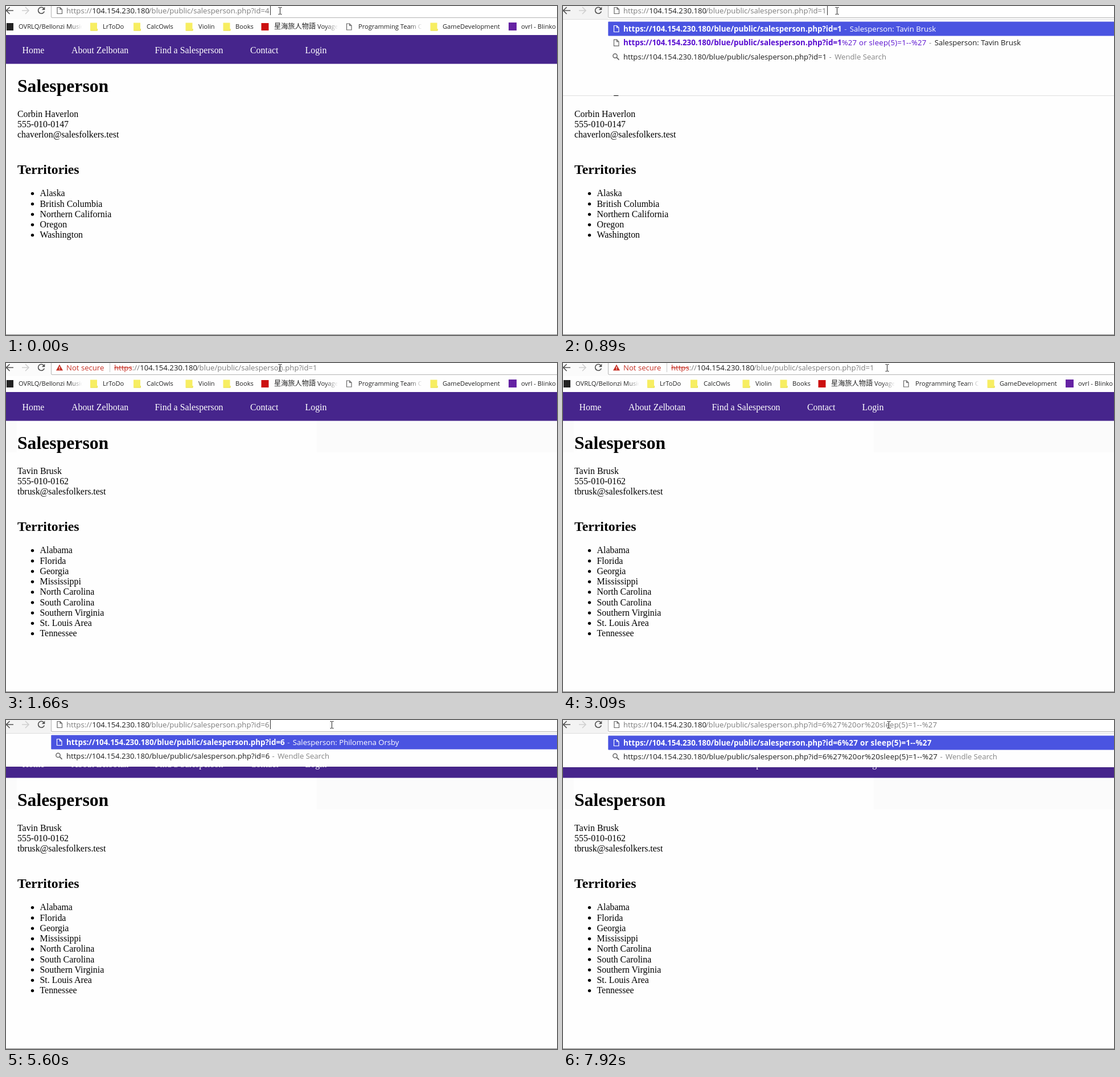
These frames come from a looping animation (968 by 578 pixels, 8 s). An HTML page:

```html
<!DOCTYPE html>
<html lang="en">
<head>
<meta charset="utf-8">
<title>Salesperson page</title>
<style>
html, body { margin: 0; width: 100%; height: 100%; overflow: hidden; background: #fefefe; }
svg { display: block; width: 100vw; height: 100vh; }
text { white-space: pre; }
.ui { font: 13.15px "Open Sans", "Noto Sans", sans-serif; }
.ui .b { font-size: 13.4px; font-weight: 700; }
.code { letter-spacing: .27px; }
.dash { letter-spacing: 1px; }
.mark { font: 11.15px "Open Sans", "Noto Sans", sans-serif; fill: #222; }
.cjk { font: 12.2px "Noto Sans CJK JP", "Noto Sans CJK", sans-serif; }
.page { font: 15.9px "Liberation Serif", "Times New Roman", serif; }
</style>
</head>
<body>
<svg id="stage" viewBox="0 0 968 578" preserveAspectRatio="none">
  <defs>
    <linearGradient id="fade">
      <stop offset="0" stop-color="#fefefe" stop-opacity="0"/>
      <stop offset="1" stop-color="#fefefe"/>
    </linearGradient>
  </defs>
  <g id="page"></g>
  <g id="marks"></g>
  <g id="menu" class="ui"></g>
  <g id="bar" class="ui"></g>
</svg>
<script>
const LOOP = 8000;
const BLUE = '#4a54e1', RED = '#c62f24', LINK = '#5a0fd0', GREY = '#7c7c7c';
const INJECTED = '%27%20or%20sleep(5)=1--%27', PLAIN = '%27 or sleep(5)=1--%27';
const ADDRESS = 'https://104.154.230.180/blue/public/salesperson.php?id=';

const people = [
  { name: 'Corbin Haverlon', phone: '555-010-0147', mail: 'chaverlon@salesfolkers.test',
    areas: ['Alaska', 'British Columbia', 'Northern California', 'Oregon', 'Washington'] },
  { name: 'Tavin Brusk', phone: '555-010-0162', mail: 'tbrusk@salesfolkers.test',
    areas: ['Alabama', 'Florida', 'Georgia', 'Mississippi', 'North Carolina', 'South Carolina',
      'Southern Virginia', 'St. Louis Area', 'Tennessee'] }
];

// Menu rows: bold part, plain part, page title
const title = name => 'Salesperson: ' + name;
const menus = {
  all: { bottom: 157, rows: [
    ['', '', ''], ['', '1', title('Tavin Brusk')],
    ['', '1' + PLAIN, title('Tavin Brusk')], ['', '3', title('Vilena Borsk')]] },
  one: { bottom: 157, rows: [
    ['1', '', title('Tavin Brusk')], ['1', PLAIN, title('Tavin Brusk')]] },
  six: { bottom: 83, rows: [['6', '', title('Philomena Orsby')]] },
  paste: { bottom: 83, rows: [['6' + PLAIN, '', '']] }
};

// Each step changes part of the state from its time on
const steps = [
  [0, { id: '4', tail: '', icon: 'page', mouse: 481.5, who: 0, caret: 464, menu: '', shift: 0,
        busy: false, warn: false, chip: false, select: '', band: 0 }],
  [120, { caret: 0 }],
  [260, { id: '', caret: 456, menu: 'all', shift: -1 }],
  [380, { shift: 0 }],
  [770, { id: '1', caret: 464, menu: 'one' }],
  [1040, { menu: '', caret: 0, icon: 'info', busy: true, band: 1 }],
  [1510, { icon: 'alert', warn: true }],
  [1660, { chip: true, busy: false, who: 1, band: 2 }],
  [2810, { mouse: 566 }],
  [2960, { mouse: 562.5 }],
  [3090, { mouse: 569.5 }],
  [3230, { mouse: 572.5 }],
  [3480, { select: 'all' }],
  [3880, { select: 'id' }],
  [5600, { id: '6', icon: 'page', warn: false, chip: false, select: '', caret: 464, menu: 'six', shift: -1 }],
  [5720, { shift: 0 }],
  [6000, { caret: 0 }], [6150, { caret: 464 }], [6300, { caret: 0 }],
  [6610, { caret: 464 }], [6760, { caret: 0 }],
  [6910, { tail: INJECTED, menu: 'paste', caret: 658 }],
  [7190, { caret: 0 }], [7340, { caret: 658 }], [7490, { caret: 0 }],
  [7770, { caret: 658 }], [7920, { caret: 0 }]
];

const $ = id => document.getElementById(id);
const rect = (x, y, w, h, fill, more = '') =>
  `<rect x="${x}" y="${y}" width="${w}" height="${h}" fill="${fill}" ${more}/>`;
const line = (d, stroke, w = 1) => `<path d="${d}" fill="none" stroke="${stroke}" stroke-width="${w}"/>`;
const text = (x, y, s, fill = '#000', more = '') => `<text x="${x}" y="${y}" fill="${fill}" ${more}>${s}</text>`;
const span = (s, fill, cls = '') => `<tspan fill="${fill}" class="${cls}">${s}</tspan>`;

const pageIcon = (x, y, c) =>
  line(`M${x - 4} ${y - 5.5}h5l3.5 3.5v7.5h-8.5zM${x + 1} ${y - 5.5}v3.5h3.5`, c, 1.2);
const searchIcon = (x, y) =>
  `<circle cx="${x - 1.5}" cy="${y - 1.5}" r="3.6" fill="none" stroke="#666" stroke-width="1.5"/>` +
  line(`M${x + 1.2} ${y + 1.2}L${x + 5.5} ${y + 5.5}`, '#666', 1.8);

const icons = {
  page: () => pageIcon(94, 8, '#666'),
  info: () => '<circle cx="94" cy="8" r="5.8" fill="none" stroke="#666" stroke-width="1.3"/>' +
    rect(93.3, 7, 1.5, 4.3, '#666') + rect(93.3, 4.4, 1.5, 1.5, '#666'),
  alert: () => `<path d="M94 2.5L100 13.3H88z" fill="${RED}"/>` +
    rect(93.4, 6.3, 1.3, 3.5, '#fff') + rect(93.4, 10.7, 1.3, 1.3, '#fff')
};

function drawPage(s) {
  const p = people[s.who];
  let out = rect(0, 0, 968, 578, '#fefefe');
  if (s.band === 1) out += rect(0, 101, 968, 56, '#fbfbfb');
  if (s.band === 2) out += rect(0, 101, 19, 56, '#fbfbfb') + rect(546, 101, 422, 56, '#fbfbfb');
  out += rect(0, 51, 968, 50.6, '#46258c') + rect(0, 577, 968, 1, '#858585');
  const nav = [[28.5, 'Home'], [115, 'About Zelbotan'], [261.5, 'Find a Salesperson'], [429, 'Contact'], [525.5, 'Login']];
  for (const [x, label] of nav) out += text(x, 82.6, label, '#fff');
  out += text(20, 151, 'Salesperson', '#000', 'font-size="31.7" font-weight="700"');
  [p.name, p.phone, p.mail].forEach((s, i) => out += text(20, 195 + i * 18.2, s));
  out += text(20, 295, 'Territories', '#000', 'font-size="23.75" font-weight="700"');
  p.areas.forEach((area, i) => {
    const y = 334.3 + i * 18.25;
    out += `<circle cx="46.5" cy="${y - 4.7}" r="2.7"/>` + text(59.5, y, area);
  });
  return `<g class="page">${out}</g>`;
}

function drawMarks() {
  const labels = [[22, 'OVRLQ/Bellonzi Music'], [170, 'LrToDo'], [247, 'CalcOwls'], [338, 'Violin'], [403, 'Books'],
    [471, '<tspan class="cjk">星海旅人物語</tspan> Voyage'], [619, 'Programming Team Co'],
    [767, 'GameDevelopment'], [905, 'ovrl - Blinko']];
  let out = rect(0, 21, 968, 30, '#fefefe');
  for (const [x, s] of labels) out += text(x, 40.2, s, '#222', 'class="mark"');
  for (const x of [134, 583, 731]) out += rect(x - 22, 27, 22, 19, 'url(#fade)') + rect(x, 27, 13, 19, '#fefefe');
  for (const x of [148, 224, 315.5, 381.5, 745.5])
    out += `<path d="M${x} 29.5h12v11h1v3h-13z" fill="#f7ee62"/>` + line(`M${x + .5} 43h12v-3`, '#e8dd55');
  out += rect(1, 30, 12, 13, '#222') + rect(448.5, 30, 13, 13, '#cc1010') + rect(883, 29, 14, 14, '#6522a3');
  return out + pageIcon(602.5, 36.5, '#666');
}

function drawMenu(s) {
  const menu = menus[s.menu];
  if (!menu) return '';
  const bottom = menu.bottom + s.shift;
  let out = rect(0, 22, 968, bottom - 22, '#fefefe') + rect(0, 23, 968, 1, '#dedede') +
    rect(0, bottom, 968, 1, '#000', 'opacity=".12"') + rect(79.3, 27.6 + s.shift, 889, 24.8, BLUE, 'rx="1"');
  const dash = fill => span(' - ', fill, 'dash');
  const baseline = i => 44.8 + s.shift + i * 24.65;
  menu.rows.forEach(([bold, plain, name], i) => {
    const on = i === 0, y = baseline(i), code = bold.length > 1 ? 'b code' : 'b';
    let parts = span(ADDRESS, on ? '#fff' : LINK, 'b') + span(bold, on ? '#fff' : LINK, code) +
      span(plain, LINK, plain.length > 1 ? 'code' : '');
    if (name) parts += dash(on ? '#c3c7f7' : '#888') + span(name, on ? '#fff' : '#1c1c1c');
    out += pageIcon(93.5, y - 4.8, on ? '#fff' : '#666') + text(106, y, parts);
  });
  const y = baseline(menu.rows.length);
  return out + searchIcon(93, y - 5) + text(106, y, span(ADDRESS + s.id, '#1c1c1c') +
    span(s.tail, '#1c1c1c', 'code') + dash('#858585') + span('Wendle Search', '#858585'));
}

function drawUrl(s) {
  const x = s.chip ? 190 : 106, all = s.select === 'all', ink = c => all ? '#fff' : c;
  let out = '';
  if (all) out += rect(x, 0, 358.5, 16, BLUE);
  if (s.select === 'id') out += rect(540, 0, 8, 16, BLUE);
  out += text(x, 12.6, span('https', ink(s.warn ? RED : GREY)) + span('://', ink(GREY)));
  if (s.warn) out += rect(x, 8, 31, 1, ink(RED));
  out += text(x + 45.3, 12.6, '104.154.230.180', ink('#1c1c1c')) +
    text(x + 144.8, 12.6, span('/blue/public/salesperson.php?id=', ink(GREY)) +
      span(s.id, s.select ? '#fff' : GREY) + span(s.tail, GREY, 'code'));
  if (s.chip) out += text(106, 12.6, 'Not secure', RED) + rect(182, 0, 1, 16, '#c8c8c8');
  return out;
}

function drawBar(s) {
  const m = s.mouse;
  let out = rect(0, 0, 79, 23, s.menu ? '#f3f3f3' : '#fbfbfb') + rect(79, 0, 889, 20, '#fff') +
    line('M79.5 0V19q0 1.5 1.5 1.5H968', '#b4b4b4') +
    line('M13 8H1M6.5 2L.5 8L6.5 14', '#555', 1.7) + line('M28 8H40M34 2L40 8L34 14', '#d0d0d0', 1.7);
  out += s.busy ? line('M56.5 2.5L67.5 13.5M67.5 2.5L56.5 13.5', '#555', 1.7)
    : line('M66.3 4.2A5.5 5.5 0 1 0 67.3 9.5', '#555', 1.7) + '<path d="M68.3 1.5V7H62.8z" fill="#555"/>';
  out += icons[s.icon]() + drawUrl(s);
  if (s.caret) out += rect(s.caret, 0, 1, 16, '#333');
  return out + line(`M${m - 3} 2.5h2.3l.7 .7l.7 -.7h2.3M${m} 3V14M${m - 3} 14.5h2.3l.7 -.7l.7 .7h2.3`, '#222');
}

let shown = -1;
function render(t) {
  const count = steps.filter(([time]) => time <= t).length;
  if (count === shown) return;
  shown = count;
  const s = Object.assign({}, ...steps.slice(0, count).map(step => step[1]));
  $('page').innerHTML = drawPage(s);
  $('menu').innerHTML = drawMenu(s);
  $('bar').innerHTML = drawBar(s);
}

$('marks').innerHTML = drawMarks();
const start = performance.now();
function tick() {
  render((performance.now() - start) % LOOP);
  requestAnimationFrame(tick);
}
tick();
</script>
</body>
</html>
```
